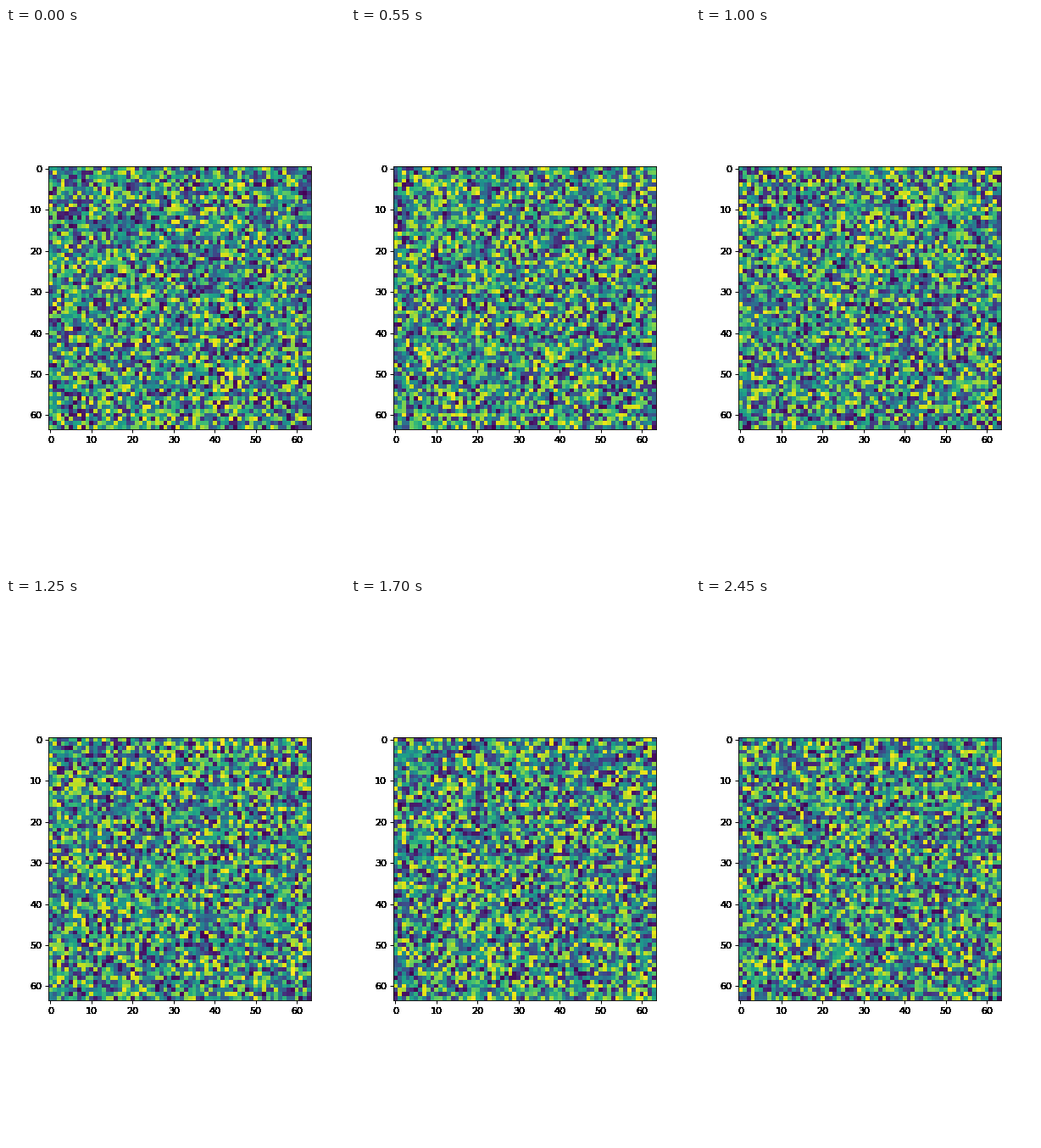
Animation of 400x640 px, one loop 2.5 s. Source, as a matplotlib script:

```python
import numpy as np
import matplotlib.pyplot as plt
from matplotlib.animation import FuncAnimation
from matplotlib.transforms import offset_copy

W, H, DPI = 400, 640, 80
FRAMES, INTERVAL = 50, 50
CELLS = 64
LABEL_LAYERS = 24  # stacked labels give the hard, heavy digits
PAD = 7  # points between the axes edge and its labels

plt.rcParams["font.family"] = "DejaVu Sans"
plt.rcParams["toolbar"] = "None"

fig = plt.figure(figsize=(W / DPI, H / DPI), dpi=DPI, facecolor="white")
fig.subplots_adjust(left=0.125, right=0.9, bottom=0.125, top=0.88)
ax = fig.add_subplot()


def noise(i):
    return np.random.default_rng(1000 + i).random((CELLS, CELLS))


image = ax.imshow(noise(0), cmap="viridis", vmin=0, vmax=1,
                  interpolation="nearest")
ax.apply_aspect()
ticks = range(0, CELLS, 10)
ax.set_xticks(ticks)
ax.set_yticks(ticks)
ax.tick_params(width=0.9, labelbottom=False, labelleft=False)

below = offset_copy(ax.get_xaxis_transform(), fig, y=-PAD, units="points")
beside = offset_copy(ax.get_yaxis_transform(), fig, x=-PAD, units="points")


def label(x, y, value, transform, ha, va):
    for _ in range(LABEL_LAYERS):
        ax.text(x, y, str(value), transform=transform, ha=ha, va=va,
                fontsize=10)


for t in ticks:
    label(t, 0, t, below, "center", "top")
    label(0, t, t, beside, "right", "center_baseline")


def update(i):
    image.set_data(noise(i))
    return [image]


anim = FuncAnimation(fig, update, frames=FRAMES, interval=INTERVAL,
                     repeat=True, repeat_delay=0, blit=False)
plt.show()
```
